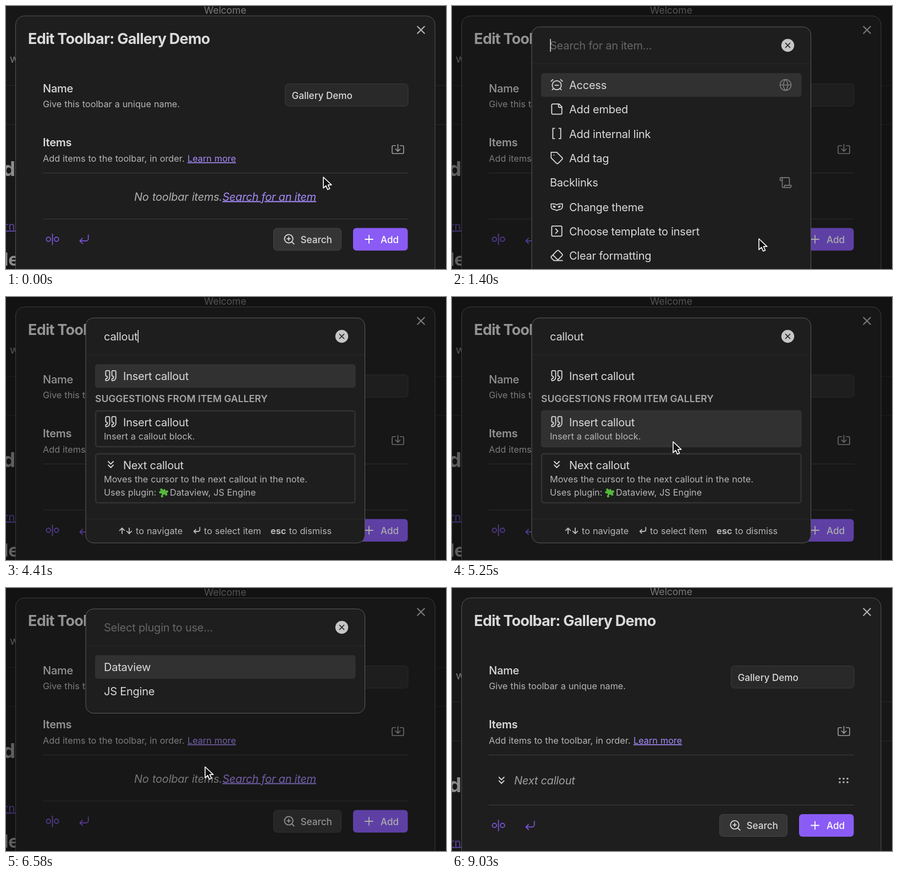
An HTML page for the animation above (9.73 s loop, 800x478 px).

```html
<!DOCTYPE html>
<html lang="en">
<head>
<meta charset="utf-8">
<title>Toolbar item gallery</title>
<style>
  html, body { margin: 0; width: 100%; height: 100%; overflow: hidden; background: #171717; }
  svg { display: block; width: 100%; height: 100%; font-weight: 430; }
  text { font-family: Inter, Roboto, sans-serif; font-optical-sizing: none; }
</style>
</head>
<body>
<svg id="stage" viewBox="0 0 800 478"></svg>
<script>
const LOOP = 9730, STEP = 70;
const OPEN_SEARCH = 1120, TYPE_START = 3850, CURSOR_BACK = 4830, OPEN_PLUGIN = 6090, DONE = 7770;
const QUERY = 'callout';
const CARET_TOGGLES = [1120, 1890, 2450, 2940, 3500, 4830, 5320, 5880, 6090, 6580, 7070, 7630];
// Pointer path: time, x, y
const PATH = [[70, 577, 311], [560, 558, 423], [4830, 558, 423], [5250, 402, 263],
  [5740, 362, 325], [6790, 362, 325], [7210, 270, 138], [8470, 270, 138], [9030, 262, 500]];

const TEXT = '#dadada', MUTED = '#b6b6b6', FAINT = '#666', LINK = '#a68af9', ACCENT = '#8a5cf5';
const quoteMark = x => `M${x} 3a2 2 0 0 0-2 2v6a2 2 0 0 0 2 2 1 1 0 0 1 1 1v1a2 2 0 0 1-2 2 1 1 0 0 0-1 1v2a1 1 0 0 0 1 1 6 6 0 0 0 6-6V5a2 2 0 0 0-2-2z`;
const ring = (x, y, r) => `M${x - r} ${y}a${r} ${r} 0 1 0 ${2 * r} 0a${r} ${r} 0 1 0 ${-2 * r} 0`;
const ICONS = {
  alarm: ring(12, 13, 8) + 'M5 3 2 6M22 6l-3-3M6.4 18.7 4 21M17.6 18.7 20 21M9 13h6',
  note: 'M16 3H5a2 2 0 0 0-2 2v14a2 2 0 0 0 2 2h14a2 2 0 0 0 2-2V8ZM15 3v4a2 2 0 0 0 2 2h4',
  brackets: 'M16 3h3v18h-3M8 21H5V3h3',
  tag: 'M12 2H2v10l9.3 9.3c.9.9 2.5.9 3.4 0l6.6-6.6c.9-.9.9-2.5 0-3.4ZM7 7h.01',
  mask: 'M2 12a5 5 0 0 0 5 5 8 8 0 0 1 5 2 8 8 0 0 1 5-2 5 5 0 0 0 5-5V7h-5a8 8 0 0 0-5 2 8 8 0 0 0-5-2H2ZM6 11c1.5 0 3 .5 3 2-2 0-3 0-3-2ZM18 11c-1.5 0-3 .5-3 2 2 0 3 0 3-2Z',
  chevronBox: 'M5 3h14a2 2 0 0 1 2 2v14a2 2 0 0 1-2 2H5a2 2 0 0 1-2-2V5a2 2 0 0 1 2-2ZM10 8l4 4-4 4',
  eraser: 'M7 21l-4.3-4.3c-1-1-1-2.5 0-3.4l9.6-9.6c1-1 2.5-1 3.4 0l5.6 5.6c1 1 1 2.5 0 3.4L13 21M22 21H7M5 11l9 9',
  globe: ring(12, 12, 10) + 'M12 2a14.5 14.5 0 0 0 0 20 14.5 14.5 0 0 0 0-20M2 12h20',
  scroll: 'M8 21h12a2 2 0 0 0 2-2v-2H10v2a2 2 0 1 1-4 0V5a2 2 0 1 0-4 0v3h4M19 17V5a2 2 0 0 0-2-2H4',
  quote: quoteMark(16) + quoteMark(5),
  chevrons: 'M7 6l5 5 5-5M7 13l5 5 5-5',
  importBox: 'M12 3v12M8 11l4 4 4-4M8 5H4a2 2 0 0 0-2 2v10a2 2 0 0 0 2 2h16a2 2 0 0 0 2-2V7a2 2 0 0 0-2-2h-4',
  zoom: ring(11, 11, 8) + 'M21 21l-4.3-4.3M11 8v6M8 11h6',
  plus: 'M5 12h14M12 5v14',
  close: 'M18 6 6 18M6 6l12 12',
  enter: 'M9 10l-5 5 5 5M20 4v7a4 4 0 0 1-4 4H4',
  up: 'M12 20V4M5 11l7-7 7 7',
  down: 'M12 4v16M5 13l7 7 7-7',
  separator: ring(4, 12, 4.2) + ring(20, 12, 4.2) + 'M12 1.5v21',
};

const ROWS = [['Access', 'alarm', 'globe'], ['Add embed', 'note'], ['Add internal link', 'brackets'],
  ['Add tag', 'tag'], ['Backlinks', '', 'scroll'], ['Change theme', 'mask'],
  ['Choose template to insert', 'chevronBox'], ['Clear formatting', 'eraser'], ['Insert callout', 'quote']];

const rect = (x, y, w, h, r, fill, stroke = 'none', width = 1) =>
  `<rect x="${x}" y="${y}" width="${w}" height="${h}" rx="${r}" fill="${fill}" stroke="${stroke}" stroke-width="${width}"/>`;
const line = (x1, x2, y, color) => `<path d="M${x1} ${y}H${x2}" stroke="${color}"/>`;
const text = (x, y, s, size, fill, attrs = '') =>
  `<text x="${x}" y="${y}" font-size="${size}" fill="${fill}" ${attrs}>${s}</text>`;
const large = (x, y, s, fill = TEXT, attrs = '') => text(x, y, s, 20, fill, 'letter-spacing="-.012em" ' + attrs);
const small = (x, y, s, fill = MUTED, attrs = '') => text(x, y, s, 16.25, fill, 'word-spacing=".025em" ' + attrs);
const label = (x, y, s, fill = TEXT) => text(x, y, s, 17.1, fill, 'font-weight="460"');
const icon = (name, cx, cy, size, color, width = 1.75) =>
  `<path d="${ICONS[name]}" transform="translate(${cx - size / 2} ${cy - size / 2}) scale(${size / 24})"
    fill="none" stroke="${color}" stroke-width="${width}" stroke-linecap="round" stroke-linejoin="round"/>`;

function pointerAt(t) {
  if (t <= PATH[0][0]) return PATH[0].slice(1);
  const next = PATH.findIndex(p => p[0] > t);
  if (next < 0) return PATH.at(-1).slice(1);
  const [t0, x0, y0] = PATH[next - 1], [t1, x1, y1] = PATH[next];
  const u = (t - t0) / (t1 - t0), k = u * u * (3 - 2 * u);
  return [x0 + (x1 - x0) * k, y0 + (y1 - y0) * k];
}

// The note behind the dialog; its words run on underneath the dialog's left edge.
function page(shift) {
  const side = (right, y, s, size, fill, attrs = '') =>
    text(right, y + shift, s, size, fill, `text-anchor="end" ${attrs}`);
  return rect(0, 0, 800, 478, 0, '#171717') +
    text(398.5, shift ? 12.5 : 13.5, 'Welcome', 17.5, '#7a7a7a', 'text-anchor="middle"') +
    line(0, 800, 144.5 + shift, '#282828') + line(0, 800, 215.5 + shift, '#282828') +
    side(23, 103, 'n w', 20, '#7a7a7a') + side(17, 308.5, 'd', 37, '#8c8c8c', 'font-weight="700"') +
    side(28, 407, 'rne', 20, '#5f44a6', 'text-decoration="underline"') +
    side(24, 472, 'le', 33, '#8c8c8c', 'font-weight="700"');
}

function dialog(hasItem, hovering) {
  const drop = hasItem ? 7.5 : 0, mid = 424 + drop;
  let grip = '';
  for (let i = 0; i < 6; i++) grip += `<circle cx="${705 + 7 * (i % 3)}" cy="${i < 3 ? 346.5 : 353}" r="1.8" fill="${MUTED}"/>`;
  const items = hasItem
    ? icon('chevrons', 90, 349.5, 22, TEXT, 2) + large(113, 357, 'Next callout', '#a0a0a0', 'font-style="italic"') + grip
    : large(233, 353.5, 'No toolbar items.', '#b0b0b0', 'font-style="italic" word-spacing=".05em"') +
      large(393.5, 353.5, 'Search for an item', LINK, 'font-style="italic" text-decoration="underline"');
  return rect(17.5, 18, 762.5, 500, 16, '#1e1e1e', '#555') +
    text(40, 68.5, 'Edit Toolbar: Gallery Demo', 27, TEXT, 'font-weight="650" letter-spacing="-.028em"') +
    icon('close', 754.5, 43.5, 25, MUTED, 2) +
    large(67, 156.5, 'Name', TEXT, 'font-weight="500"') + small(67, 183.5, 'Give this toolbar a unique name.') +
    rect(507.5, 141.5, 223.5, 40.5, 6, '#292929', '#3a3a3a') + label(519.5, 168.5, 'Gallery Demo') +
    large(67, 255, 'Items', TEXT, 'font-weight="600"') + small(67, 283, 'Add items to the toolbar, in order.') +
    small(330, 283, 'Learn more', LINK, 'text-decoration="underline"') +
    icon('importBox', 712.5, 261, 25, '#999', 1.6) +
    line(67, 731, 303.5, '#3f3f3f') + items + line(67, 731, 387 + drop, '#3f3f3f') +
    icon('separator', 84.5, mid, 22, '#7d55dc', 1.9) + icon('enter', 142, mid, 23, '#7d55dc', 1.8) +
    rect(486.5, mid - 20, 123, 40, 6, hovering ? '#3f3f3f' : '#353535', '#454545') +
    icon('zoom', 515, mid, 23, TEXT, 1.9) + label(535.5, mid + 6.5, 'Search') +
    rect(631, mid - 20.5, 99.5, 41, 6, ACCENT) + icon('plus', 660, mid, 24, '#fff', 1.8) +
    label(681, mid + 6.5, 'Add', '#fff');
}

function modal(bottom, typed, placeholder, body) {
  return rect(0, 0, 800, 478, 0, 'rgba(10,10,10,.34)') +
    rect(145, 38, 507.5, bottom - 38, 14, '#1e1e1e', '#5c5c5c') +
    line(146, 652, 105, '#2b2b2b') +
    (typed ? '' : large(178, 79, placeholder, FAINT)) + large(178, 79, typed, TEXT, 'id="typed"') +
    '<path id="caret" d="M0 60V83" stroke="#e6e6e6" stroke-width="1.5"/>' +
    '<circle cx="610.5" cy="71.5" r="11.7" fill="#c6c6c6"/>' + icon('close', 610.5, 71.5, 16, '#1e1e1e', 2.6) + body;
}

function rowList(rows, selected = 0) {
  return rows.map(([name, glyph, kind], i) => {
    const cy = 143.5 + 44.35 * i;
    return (i === selected ? rect(162, cy - 21.5, 473.5, 43, 5, '#313131') : '') +
      (glyph ? icon(glyph, 190.5, cy - .5, 24.6, TEXT) : '') + large(glyph ? 213 : 178, cy + 7.3, name) +
      (kind ? icon(kind, 606.5, cy, 24, '#7a7a7a', 1.6) : '');
  }).join('');
}

function results(selected) {
  const card = (index, y, h) => rect(163, y + 1, 471.5, h - 2, 4, selected === index ? '#313131' : '#1e1e1e', '#333', 2.4);
  const puzzle = '<path d="M279 351h4c-2-5 5-5 4 0h4v4c5-2 5 6 0 4v4h-4c1-5-6-4-4 0h-4v-4c4 1 4-5 0-4z" transform="rotate(-25 285 355)" fill="#55b83d"/>';
  return rowList([['Insert callout', 'quote']], selected === 0 ? 0 : -1) +
    text(162, 191.2, 'SUGGESTIONS FROM ITEM GALLERY', 17.5, '#a6a6a6', 'font-weight="600"') +
    card(1, 206, 67) + icon('quote', 190.5, 226.5, 24.6, TEXT) + large(213, 235, 'Insert callout') +
    small(178, 259, 'Insert a callout block.') +
    card(2, 284, 91) + icon('chevrons', 190.5, 304.5, 22, TEXT, 2) + large(213, 313, 'Next callout') +
    small(178, 336.5, 'Moves the cursor to the next callout in the note.') +
    small(178, 361, 'Uses plugin:') + puzzle + small(298, 361, 'Dataview, JS Engine') +
    line(146, 652, 404, '#2b2b2b') +
    icon('up', 211, 425, 15, MUTED, 3) + icon('down', 224, 425, 15, MUTED, 3) + small(236, 431, 'to navigate') +
    icon('enter', 347, 424, 16, MUTED, 2.8) + small(360, 431, 'to select item') +
    small(481, 431, 'esc', MUTED, 'font-weight="700"') + small(514.5, 431, 'to dismiss');
}

function selectedResult(t, y) {
  if (t < CURSOR_BACK || y > 378) return 0;
  return y > 279 ? 2 : 1;
}

function searchModal(t, y) {
  const typed = QUERY.slice(0, Math.max(0, Math.floor((t - TYPE_START) / STEP) + 1));
  const placeholder = 'Search for an item...';
  if (typed.length > 2) return modal(447, typed, placeholder, results(selectedResult(t, y)));
  const fuzzy = new RegExp([...typed].join('.*'), 'i');
  return modal(520, typed, placeholder, rowList(ROWS.filter(row => fuzzy.test(row[0]))));
}

function pointer(x, y) {
  return `<path d="M0 0V21l5-4.6 3.2 7.4 4-1.7-3.2-7.2h6.6z" transform="translate(${x} ${y}) scale(.95)"
    fill="#111" stroke="#fff" stroke-width="1.7" stroke-linejoin="round"/>`;
}

const stage = document.getElementById('stage');
function render(t) {
  const [x, y] = pointerAt(t), done = t >= DONE;
  let scene = page(done ? 62.5 : 0) + dialog(done, t < OPEN_SEARCH && y > 403);
  if (t >= OPEN_SEARCH && t < OPEN_PLUGIN) scene += searchModal(t, y);
  if (t >= OPEN_PLUGIN && !done) scene += modal(227.5, '', 'Select plugin to use...', rowList([['Dataview'], ['JS Engine']]));
  if (t < TYPE_START || t >= CURSOR_BACK) scene += pointer(x, y);
  stage.innerHTML = scene;

  const caret = document.getElementById('caret');
  if (!caret) return;
  const visible = CARET_TOGGLES.filter(at => at <= t).length % 2;
  caret.setAttribute('visibility', visible ? 'visible' : 'hidden');
  caret.setAttribute('transform', `translate(${179 + document.getElementById('typed').getComputedTextLength()} 0)`);
}

let shown = -1;
function tick() {
  const t = Math.floor(performance.now() % LOOP / STEP) * STEP;
  if (t !== shown) render(shown = t);
  requestAnimationFrame(tick);
}
tick();
</script>
</body>
</html>
```
